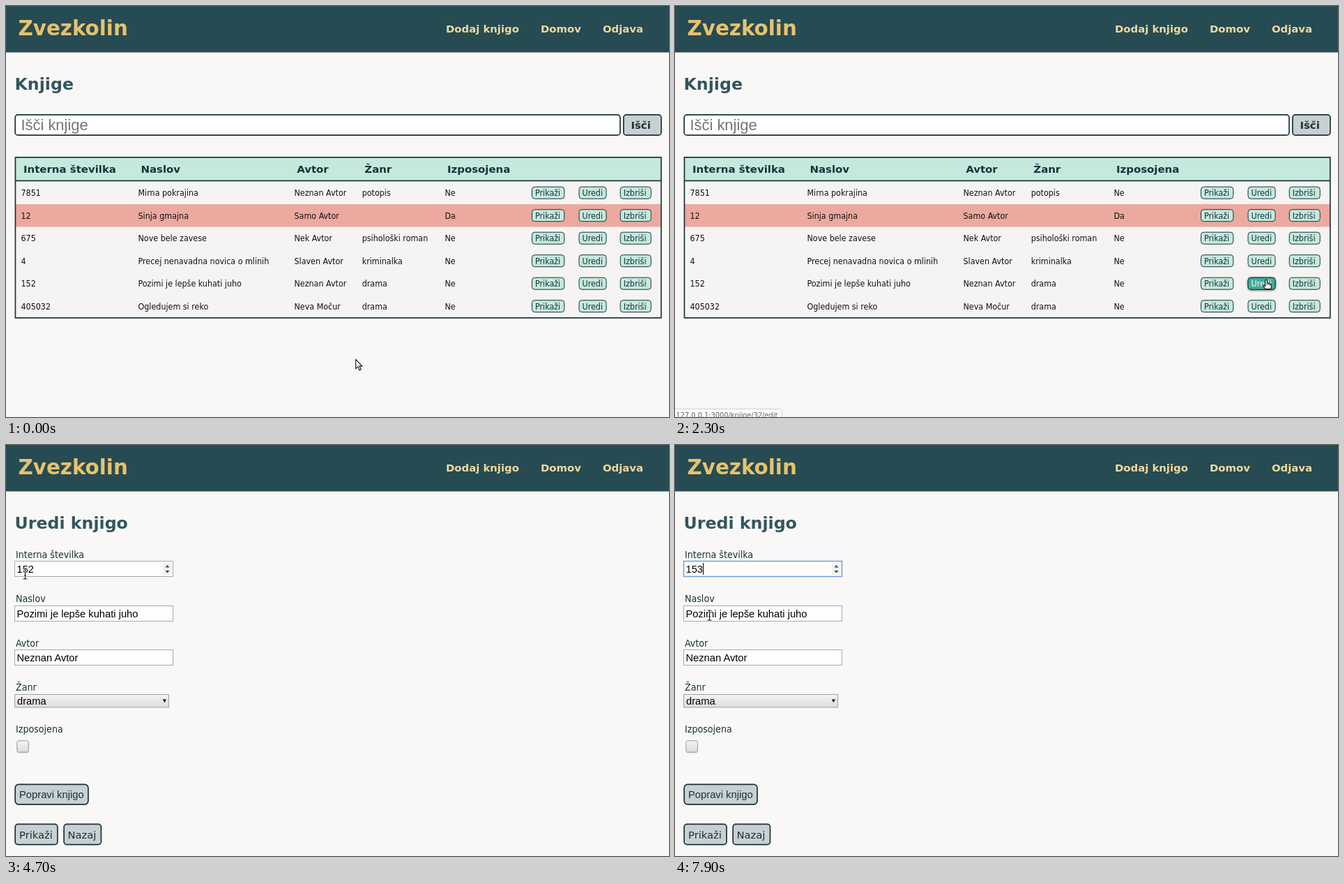
Animation, 951 px wide and 589 px high, one loop 8000 ms. Source, as an HTML page:

```html
<!DOCTYPE html>
<html lang="sl">
<head>
<meta charset="utf-8">
<title>Knjige</title>
<style>
html, body { margin: 0; width: 100%; height: 100%; overflow: hidden; background: #f9f8f6; }
svg { display: block; width: 951px; height: 589px; }
text { white-space: pre; }
.b { font-family: "DejaVu Sans", sans-serif; font-weight: 700; }
.v { font-family: "DejaVu Sans", sans-serif; }
.c { font-family: "DejaVu Sans Condensed", "DejaVu Sans", sans-serif; font-stretch: semi-condensed; }
.a { font-family: "Liberation Sans", Arial, sans-serif; }
</style>
</head>
<body>
<svg id="stage" viewBox="0 0 951 589" xmlns="http://www.w3.org/2000/svg">
  <defs>
    <linearGradient id="grey" x1="0" y1="0" x2="0" y2="1">
      <stop offset="0" stop-color="#f4f4f4"/><stop offset="1" stop-color="#dcdcdc"/>
    </linearGradient>
    <filter id="soft" x="-20%" y="-30%" width="140%" height="180%">
      <feDropShadow dx="0" dy="1" stdDeviation="1.4" flood-color="#000" flood-opacity=".55"/>
    </filter>
  </defs>
  <g id="top"></g>
  <g id="list"></g>
  <g id="form"></g>
  <g id="status"></g>
  <g id="arrow"><path d="M0 0V13.2L3.1 10.4L5.3 15.4L7.5 14.4L5.3 9.6H9.2Z" fill="#fff" stroke="#111" stroke-width="1.1"/></g>
  <g id="hand"><path d="M-1.6 9.2V1.2Q-1.6-.4-.3-.4T1 1.2V4.4Q2.8 3.6 3.4 5Q5 4.4 5.6 5.8Q7 5.6 7 7.2V9.6Q7 11 6 13H-1.6Q-2.8 10.9-5 8.6Q-5.2 6.6-3.4 7.2Z" fill="#fff" stroke="#111" stroke-width="1.1"/><path d="M1 4.6V7.4M3.4 5.2V7.6M5.6 6V8" stroke="#111" stroke-width=".9"/></g>
  <g id="beam" fill="none"><path d="M-3-7H-1Q0-7 0-6Q0-7 1-7H3M0-6V6M-3 7H-1Q0 7 0 6Q0 7 1 7H3M-1.6 2H1.6" stroke="#fff" stroke-width="2.6"/><path d="M-3-7H-1Q0-7 0-6Q0-7 1-7H3M0-6V6M-3 7H-1Q0 7 0 6Q0 7 1 7H3M-1.6 2H1.6" stroke="#222" stroke-width="1.2"/></g>
</svg>
<script>
const $ = id => document.getElementById(id);
const INK = '#17323a', MINT = '#c5e9dd', GREY = '#c8d0d1';

function add(parent, tag, attrs, content) {
  const el = document.createElementNS('http://www.w3.org/2000/svg', tag);
  for (const k in attrs) el.setAttribute(k, attrs[k]);
  if (content) el.textContent = content;
  return parent.appendChild(el);
}
const rect = (p, x, y, width, height, fill, more) =>
  add(p, 'rect', { x, y, width, height, fill, ...more });
const text = (p, cls, size, x, y, fill, s) =>
  add(p, 'text', { class: cls, 'font-size': size, x, y, fill }, s);
const box = (p, x, y, w, h, fill, line, r) =>
  rect(p, x + line / 2, y + line / 2, w - line, h - line, fill,
    { stroke: INK, 'stroke-width': line, rx: r });

// Header
const header = $('top');
rect(header, 0, 0, 951, 66.5, '#264b52');
text(header, 'b', 29.35, 17.5, 42, '#e6c26f', 'Zvezkolin');
[[631, 'Dodaj knjigo'], [767, 'Domov'], [856, 'Odjava']]
  .forEach(([x, s]) => text(header, 'b', 14.85, x, 38, '#f0d9a0', s));

// Book list
const list = $('list');
text(list, 'b', 23.7, 12.5, 120, '#33565f', 'Knjige');
box(list, 12.3, 155, 869.5, 31, '#fff', 1.7, 4);
text(list, 'a', 21.9, 21.5, 178, '#757575', 'Išči knjige');
box(list, 885, 155, 55.7, 31, GREY, 1.7, 4);
text(list, 'b', 14.85, 896.5, 176.3, INK, 'Išči');
rect(list, 13, 217, 927, 230, '#f5f4f2');
rect(list, 13, 217, 927, 33, MINT);
rect(list, 13, 284, 927, 32.5, '#eca99f');
rect(list, 13, 249.6, 927, 1.7, INK);
box(list, 12.6, 216, 928, 231.8, 'none', 1.7, 0);
[[25, 'Interna številka'], [193.5, 'Naslov'], [417.2, 'Avtor'], [514.3, 'Žanr'], [633, 'Izposojena']]
  .forEach(([x, s]) => text(list, 'b', 14.95, x, 239, INK, s));

const TITLE = 'Pozimi je lepše kuhati juho', AUTHOR = 'Neznan Avtor';
const books = [
  ['7851', 'Mirna pokrajina', AUTHOR, 'potopis', 'Ne'],
  ['12', 'Sinja gmajna', 'Samo Avtor', '', 'Da'],
  ['675', 'Nove bele zavese', 'Nek Avtor', 'psihološki roman', 'Ne'],
  ['4', 'Precej nenavadna novica o mlinih', 'Slaven Avtor', 'kriminalka', 'Ne'],
  ['152', TITLE, AUTHOR, 'drama', 'Ne'],
  ['405032', 'Ogledujem si reko', 'Neva Močur', 'drama', 'Ne']
];
const cols = [21.5, 189.5, 413.5, 510.7, 629.5];
const actions = [[754, 47.3, 'Prikaži'], [821.5, 40, 'Uredi'], [880.7, 45, 'Izbriši']];
books.forEach((book, i) => {
  const y = 267.7 + 32.5 * i;
  book.forEach((s, j) => text(list, 'c', 12.4, cols[j], y + 4.3, '#111', s));
  actions.forEach(([x, w, s]) => {
    box(list, x, y - 9, w, 18, MINT, 1, 4);
    text(list, 'c', 12.4, x + 5, y + 4.3, INK, s);
  });
});
const hover = add(list, 'g');
box(hover, 821.5, 388.7, 40, 18, '#3fae97', 1, 4).setAttribute('filter', 'url(#soft)');
text(hover, 'c', 12.4, 826.5, 402, '#f4fffb', 'Uredi');

// Edit form
const form = $('form');
text(form, 'b', 23.7, 12.5, 120, '#33565f', 'Uredi knjigo');
[[161.5, 'Interna številka'], [225, 'Naslov'], [288.5, 'Avtor'], [352.3, 'Žanr'], [412.3, 'Izposojena']]
  .forEach(([y, s]) => text(form, 'c', 14.1, 14, y, INK, s));
const fields = [[166, '152'], [230, TITLE], [293, AUTHOR]].map(([y, s]) => ({
  frame: rect(form, 12.5, y + .5, 227, 22, '#fffefd', { stroke: '#a8a8a8' }),
  value: text(form, 'a', 14.7, 15.5, y + 16.5, '#000', s)
}));
const spin = add(form, 'g');
rect(spin, 225, 169, 13, 17, '#f1f1f0');
add(spin, 'path', { d: 'M228.5 175.5L231.5 172L234.5 175.5ZM228.5 180L231.5 183.5L234.5 180Z', fill: '#444' });
const caret = rect(form, 40, 169, 1, 17, '#000');
rect(form, 12.5, 357.5, 221, 18.5, 'url(#grey)', { stroke: '#a0a0a0' });
text(form, 'a', 14.7, 16, 372, '#000', 'drama');
add(form, 'path', { d: 'M224.7 364.5H230L227.4 369.3Z', fill: '#111' });
rect(form, 15.8, 424.8, 16.6, 16.6, '#bbb', { rx: 2.5, opacity: .6 });
rect(form, 15.8, 423.8, 16.6, 16.4, 'url(#grey)', { rx: 2.5, stroke: '#999' });
box(form, 12.3, 485.6, 106.5, 30.3, GREY, 1.7, 5);
text(form, 'a', 14.75, 19, 505.5, INK, 'Popravi knjigo');
box(form, 12.3, 542.6, 62.5, 30.8, GREY, 1.7, 4);
text(form, 'v', 14.75, 19, 564, INK, 'Prikaži');
box(form, 82.3, 542.6, 55, 30.8, GREY, 1.7, 4);
text(form, 'v', 14.75, 88.5, 564, INK, 'Nazaj');

// Browser status bubble
const status = $('status');
rect(status, -5, 577.5, 158.5, 20, '#fbfbfa', { stroke: '#d0d0cf', rx: 3 });
const link = text(status, 'v', 9.8, 1.5, 590.3, '#666', '127.0.0.1:3000/knjige/32/edit');

// Pointer: time, x, y, shape; straight moves between equal shapes
const track = [
  [0, 501.7, 506.5, 'arrow'], [100, 501.7, 506.5, 'arrow'], [200, 500, 507.5, 'arrow'],
  [400, 500, 507.5, 'arrow'], [500, 530, 496, 'arrow'], [700, 655, 434, 'arrow'],
  [800, 655, 434, 'arrow'], [1200, 760, 413, 'arrow'], [1600, 868, 395, 'arrow'],
  [1700, 873, 389, 'arrow'], [1800, 846.5, 391.5, 'hand'], [2200, 848, 393, 'hand'],
  [2600, 849, 391.5, 'hand'], [2700, 833, 395, 'hand'], [2800, 839, 396, 'hand'],
  [2900, 842, 396.5, 'hand'], [3400, 841.5, 397.7, 'arrow'], [3700, 841.5, 397.7, 'arrow'],
  [3800, 840, 405, 'arrow'], [3900, 832, 425, 'arrow'], [4000, 832, 425, 'arrow'],
  [4100, 300, 350, 'arrow'], [4200, 20, 296.5, 'beam'], [4400, 21, 272, 'arrow'],
  [4500, 22, 242, 'beam'], [4600, 25, 200, 'arrow'], [4700, 27.5, 185, 'beam'],
  [5000, 38, 184, 'beam'], [5300, 38, 184, 'beam'], [5700, 43, 184, 'beam'],
  [5900, 42, 184, 'beam'], [6000, 37, 184, 'beam'], [6300, 0, 0, 'none'],
  [7000, 40, 204.5, 'arrow'], [7100, 46, 240, 'beam'], [7200, 60, 268, 'arrow'],
  [7300, 74, 302, 'beam'], [7400, 70, 299, 'beam'], [7500, 60, 272, 'arrow'],
  [7600, 53, 250, 'beam'], [7800, 49.5, 244, 'beam'], [8000, 49.5, 244, 'beam']
];
// Number field: time, text, caret shown
const typing = [
  [0, '152', 0], [5000, '152', 1], [5500, '152', 0], [6200, '15', 1],
  [6700, '153', 1], [7400, '153', 0], [7900, '153', 1]
];
const lastAt = (table, t) => table.findLastIndex(row => row[0] <= t);
const show = (el, on) => { el.style.display = on ? '' : 'none'; };

function render(t) {
  t = Math.floor(t / 100) * 100;
  const i = lastAt(track, t), [t0, x0, y0, shape] = track[i];
  const next = track[i + 1];
  const k = next[3] === shape ? (t - t0) / (next[0] - t0) : 0;
  const x = x0 + (next[1] - x0) * k;
  const y = y0 + (next[2] - y0) * k;
  for (const id of ['arrow', 'hand', 'beam']) {
    show($(id), id === shape);
    $(id).setAttribute('transform', `translate(${x} ${y})`);
  }
  show(list, t < 3400);
  show(form, t >= 3400);
  show(hover, t >= 1800);
  show(status, t >= 1800 && t < 3900);
  status.setAttribute('opacity', t === 3800 ? .5 : 1);
  link.setAttribute('fill', t === 1800 ? '#8c8c8c' : '#666');

  const [, value, on] = typing[lastAt(typing, t)];
  fields[0].value.textContent = value;
  show(caret, on);
  caret.setAttribute('x', value.length > 2 ? 40 : 32);
  show(spin, t >= 4700);
  fields[0].frame.setAttribute('stroke', t >= 5000 ? '#6f9fd8' : '#a8a8a8');
  fields[0].frame.setAttribute('stroke-width', t >= 5000 ? 1.5 : 1);
}

const start = performance.now();
function tick(now) {
  render(Math.max(0, now - start) % 8000);
  requestAnimationFrame(tick);
}
render(0);
requestAnimationFrame(tick);
</script>
</body>
</html>
```
